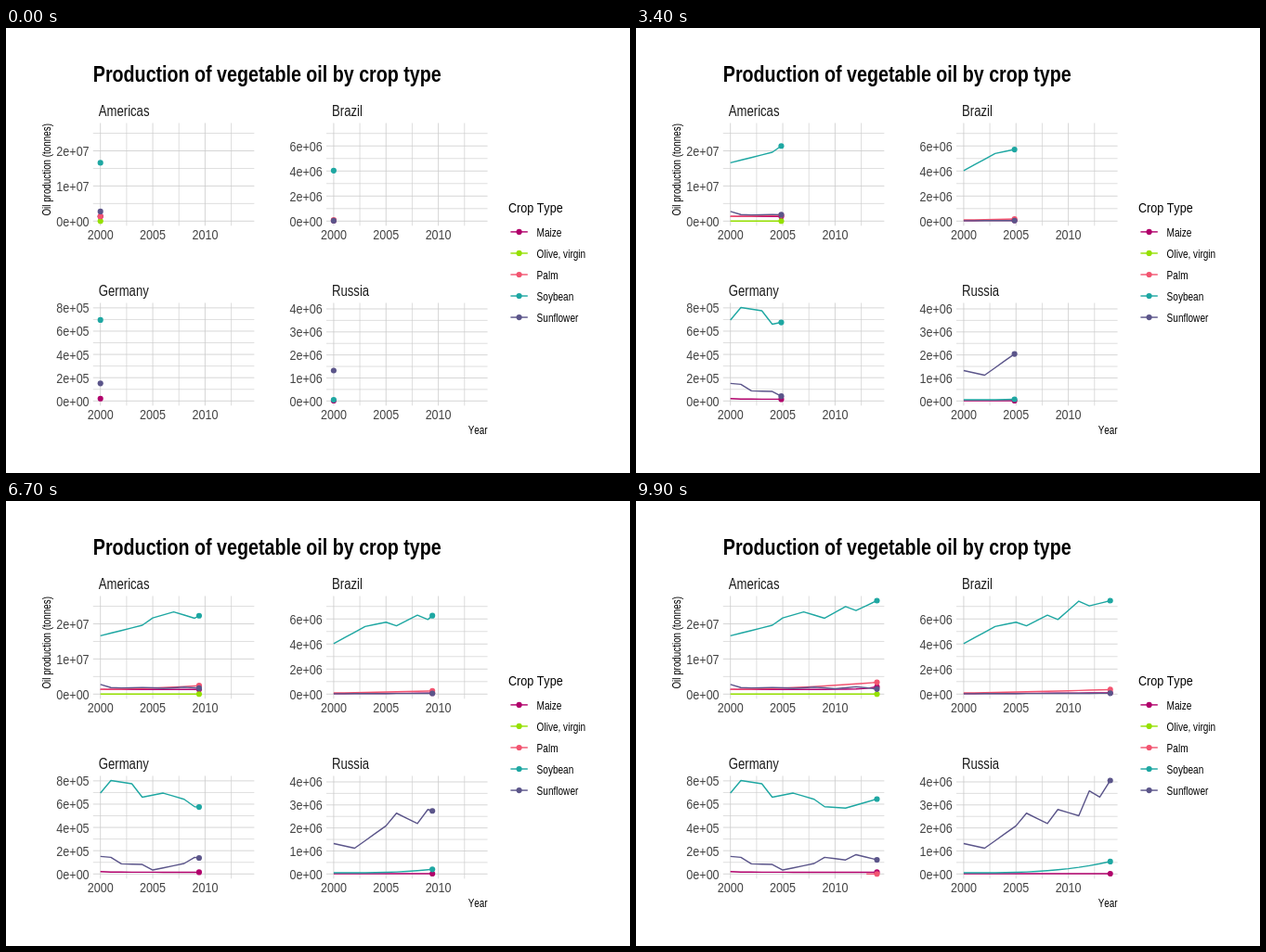
Write an HTML page that moves like this. It is 672 by 480 pixels and loops after 10 s.

```html
<!DOCTYPE html>
<html lang="en">
<head>
<meta charset="utf-8">
<title>Production of vegetable oil by crop type</title>
<style>
  html, body { margin: 0; width: 100%; height: 100%; overflow: hidden; background: #fff; }
  svg { display: block; width: 672px; height: 480px; }
  text { font-family: "Liberation Sans", Arial, sans-serif; font-kerning: none; }
  .title { font-size: 24px; font-weight: bold; }
  .strip { font-size: 16px; fill: #1a1a1a; }
  .tick { font-size: 15.33px; fill: #444; }
  .axis { font-size: 12px; }
  .legend-title { font-size: 15.33px; }
  .legend-label { font-size: 12.27px; }
  .end { text-anchor: end; }
  .middle { text-anchor: middle; }
  .major { stroke: #ccc; stroke-width: .8; }
  .minor { stroke: #ccc; stroke-width: .65; }
  .series { fill: none; stroke-width: 1.42; stroke-linejoin: round; }
</style>
</head>
<body>
<svg id="stage" viewBox="0 0 672 480"></svg>
<script>
const FRAME_MS = 100, FRAMES = 100, SPAN = 14;
const YEAR_W = 11.27, PLOT_H = 100.8, PAD = 5, DOT_R = 3.07;
const NARROW = 0.82; // condensed face, same for every label
const CROPS = {
  Maize: '#b1006b',
  'Olive, virgin': '#95e000',
  Palm: '#f25470',
  Soybean: '#1ea7a2',
  Sunflower: '#5b558a'
};

const stage = document.getElementById('stage');
const lerp = (a, b, t) => a + (b - a) * t;
const flat = v => () => v;
const grow = (from, to, power = 1) => t => lerp(from, to, (t / SPAN) ** power);

// Straight runs between turning points, given as { year: value }
function turns(points) {
  const keys = Object.keys(points).map(Number);
  return t => {
    const i = Math.max(1, keys.findIndex(k => k >= t));
    const a = keys[i - 1], b = keys[i];
    return lerp(points[a], points[b], (t - a) / (b - a));
  };
}

// Values are in units of 10^exp; every panel is scaled to its peak
const panels = [
  {
    name: 'Americas', exp: 6, step: 10, peak: 26.6,
    data: {
      Maize: grow(1.35, 2.05, 12),
      'Olive, virgin': flat(0.02),
      Palm: grow(1.33, 3.35, 1.6),
      Soybean: turns({ 0: 16.6, 4: 19.6, 5: 21.7, 7: 23.4, 9: 21.6, 11: 24.9, 12: 23.8, 14: 26.6 }),
      Sunflower: t => 1.8 + 0.95 * Math.exp(-3 * t) + 0.025 * t * Math.cos(t * Math.PI / 2)
    }
  },
  {
    name: 'Brazil', exp: 6, step: 2, peak: 7.46,
    data: {
      Maize: grow(0.04, 0.1),
      Palm: grow(0.1, 0.36, 1.3),
      Soybean: turns({ 0: 4.03, 3: 5.4, 5: 5.74, 6: 5.45, 8: 6.3, 9: 5.95, 11: 7.42, 12: 7.04, 14: 7.46 }),
      Sunflower: grow(0.03, 0.07)
    }
  },
  {
    name: 'Germany', exp: 5, step: 2, peak: 8.03,
    data: {
      Maize: t => 0.15 + 0.05 * Math.exp(-t),
      Palm: flat(0),
      Soybean: turns({ 0: 6.96, 1: 8.03, 3: 7.75, 4: 6.6, 6: 6.95, 8: 6.42, 9: 5.78, 11: 5.66, 14: 6.44 }),
      Sunflower: turns({ 0: 1.51, 1: 1.43, 2: 0.87, 4: 0.82, 5: 0.34, 8: 0.9, 9: 1.43, 11: 1.2, 12: 1.66, 14: 1.22 })
    },
    since: { Palm: 13 }
  },
  {
    name: 'Russia', exp: 6, step: 1, peak: 4.06,
    data: {
      Maize: flat(0.01),
      Soybean: grow(0.05, 0.54, 3),
      Sunflower: turns({ 0: 1.32, 2: 1.12, 5: 2.09, 6: 2.64, 8: 2.19, 9: 2.8, 11: 2.53, 12: 3.61, 13: 3.34, 14: 4.06 })
    }
  }
];

function add(tag, attrs) {
  const el = document.createElementNS('http://www.w3.org/2000/svg', tag);
  for (const key in attrs) el.setAttribute(key, attrs[key]);
  return stage.appendChild(el);
}

function label(str, x, y, cls, turn = 0) {
  const transform = `translate(${x} ${y}) rotate(${turn}) scale(${NARROW} 1)`;
  add('text', { class: cls, transform }).textContent = str;
}

const line = (x1, y1, x2, y2, cls) => add('line', { x1, y1, x2, y2, class: cls });

function tickText(value, exp) {
  if (!value) return '0e+00';
  const [digits, power] = (value * 10 ** exp).toExponential().split('e+');
  return `${digits}e+0${power}`;
}

function drawPanel(p, index) {
  const x0 = 101.7 + (index % 2) * 251.2;
  const y0 = 208.3 + Math.floor(index / 2) * 194;
  const left = x0 - 0.7 * YEAR_W, right = x0 + (SPAN + 0.7) * YEAR_W;
  const top = y0 - PLOT_H - PAD, bottom = y0 + PAD;
  const toX = year => x0 + year * YEAR_W;
  const toY = value => y0 - value / p.peak * PLOT_H;
  const gridX = (year, cls) => line(toX(year), top, toX(year), bottom, cls);
  const gridY = (value, cls) => line(left, toY(value), right, toY(value), cls);

  for (let v = p.step / 2; toY(v) > top; v += p.step) gridY(v, 'minor');
  for (let year = 2.5; year < SPAN; year += 5) gridX(year, 'minor');
  for (let v = 0; toY(v) > top; v += p.step) {
    gridY(v, 'major');
    label(tickText(v, p.exp), left - 4.2, toY(v) + 5.5, 'tick end');
  }
  for (let year = 0; year < SPAN; year += 5) {
    gridX(year, 'major');
    label(2000 + year, toX(year), bottom + 15, 'tick middle');
  }
  label(p.name, left + 6, top - 7.2, 'strip');

  const series = Object.entries(p.data).map(([crop, value]) => ({
    value, toX, toY,
    since: p.since?.[crop] ?? 0,
    color: CROPS[crop],
    path: add('path', { class: 'series', stroke: CROPS[crop] })
  }));
  for (const s of series) s.dot = add('circle', { r: DOT_R, fill: s.color });
  return series;
}

function drawLegend() {
  label('Crop Type', 541, 199.4, 'legend-title');
  Object.entries(CROPS).forEach(([crop, color], i) => {
    const y = 219.9 + i * 23.04;
    line(543.4, y, 561.8, y, 'series').setAttribute('stroke', color);
    add('circle', { cx: 552.6, cy: y, r: DOT_R, fill: color });
    label(crop, 571.6, y + 4.8, 'legend-label');
  });
}

// Each whole year falls on a whole step, with even motion in between
const yearStep = year => Math.round(year * (FRAMES - 1) / SPAN);

function yearAt(step) {
  let year = 0;
  while (yearStep(year + 1) <= step) year++;
  return year + (step - yearStep(year)) / (yearStep(year + 1) - yearStep(year));
}

function update({ value, toX, toY, since, path, dot }, now) {
  const visible = now >= since;
  path.setAttribute('visibility', visible ? 'visible' : 'hidden');
  dot.setAttribute('visibility', visible ? 'visible' : 'hidden');
  if (!visible) return;

  const whole = Math.floor(now);
  const points = [];
  for (let year = since; year <= whole; year++) points.push([toX(year), toY(value(year))]);
  const next = Math.min(whole + 1, SPAN);
  const tip = [toX(now), toY(lerp(value(whole), value(next), now - whole))];
  path.setAttribute('d', 'M' + [...points, tip].join('L'));
  dot.setAttribute('cx', tip[0]);
  dot.setAttribute('cy', tip[1]);
}

label('Production of vegetable oil by crop type', 93.8, 58.4, 'title');
label('Oil production (tonnes)', 48, 202.6, 'axis', -90);
label('Year', 518.5, 438, 'axis end');
const allSeries = panels.flatMap(drawPanel);
drawLegend();

const start = performance.now();
function render() {
  const step = Math.floor((performance.now() - start) / FRAME_MS) % FRAMES;
  const year = yearAt(step);
  for (const s of allSeries) update(s, year);
  requestAnimationFrame(render);
}
render();
</script>
</body>
</html>
```
